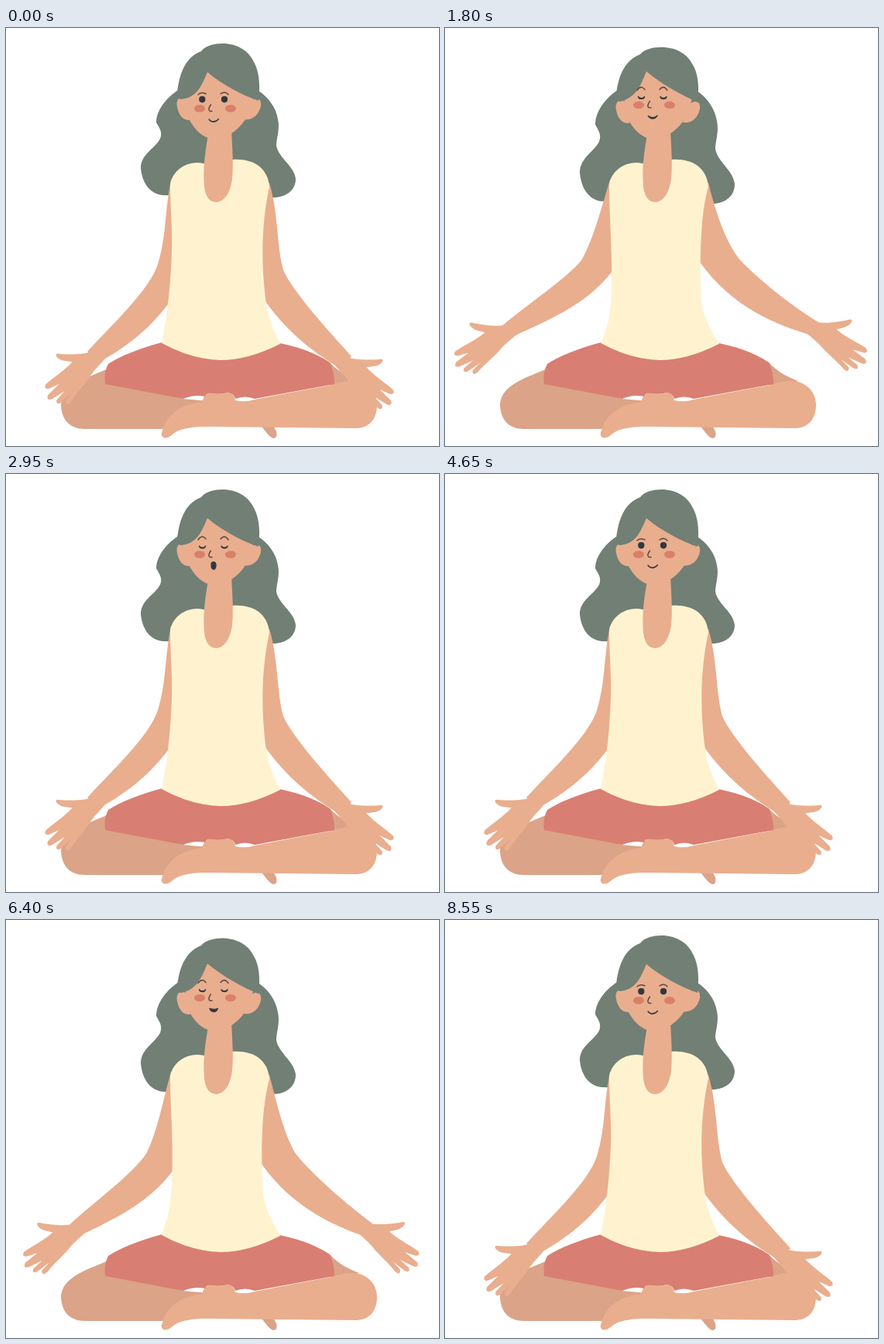
An HTML page that plays this animation: 559x540 px, repeating every 8.8 s.

```html
<!DOCTYPE html>
<html lang="en">
<head>
<meta charset="utf-8">
<title>Breathing exercise</title>
<style>
html, body { margin: 0; width: 100%; height: 100%; overflow: hidden; background: #fff; }
svg { display: block; width: 559px; height: 540px; }
.hair { fill: #717f75; }
.skin { fill: #e9ae8e; }
.shade { fill: #dba388; }
.ink { fill: #30383f; stroke: #30383f; stroke-width: 1.3; stroke-linejoin: round; }
.line { fill: none; stroke: #59463f; stroke-width: 1.4; stroke-linecap: round; }
</style>
</head>
<body>
<svg viewBox="0 0 559 540">
  <defs>
    <!-- left hand, wrist at the origin -->
    <path id="hand" d="M8-8C-5-4-20-6-37-9Q-46-12-43-6C-38 1-29 1-24 3
      C-36 13-50 19-62 27Q-66 33-59 33L-45 29L-61 41Q-65 48-57 47L-39 39
      L-51 49Q-53 56-46 53L-30 42L-40 52Q-40 60-33 54C-24 43-14 36-5 26C3 17 9 13 17 6Z"/>
  </defs>
  <path id="backHair" class="hair" d="M226 78C208 88 194 106 194 122C199 131 202 134 199 143
    C192 156 174 163 174 181C176 201 186 214 202 216L235 217L345 219C361 219 374 210 374 195
    C372 178 352 168 349 152C349 143 354 130 351 118C349 103 338 88 324 80Z"/>

  <path class="shade" d="M132 440C108 451 72 460 71 487C72 509 85 518 102 518L205 518L262 500L262 482L228 479Z"/>
  <path class="shade" d="M418 432C428 443 440 450 456 456L420 466Z"/>
  <path class="shade" d="M329 514C335 520 339 528 345 530Q351 530 349 521L344 512Z"/>
  <path class="skin" d="M420 461C440 454 455 455 463 460C474 466 479 476 479 488C478 510 465 518 447 517L262 515
    C238 515 223 518 215 525Q208 531 203 529Q199 527 202 520C207 500 226 486 253 483C256 475 258 471 266 472
    Q276 474 288 471Q294 472 296 481Q308 484 321 480Z"/>

  <path id="armL" class="skin"/>
  <path id="armR" class="skin"/>
  <path fill="#d97e72" d="M202 406C172 414 147 424 132 434Q126 445 128 460L229 479Q243 473 257 476
    Q258 471 266 472Q276 474 287 471Q294 472 296 479Q309 474 321 479L424 460Q424 444 418 432
    C397 418 373 411 353 407Z"/>
  <use id="handL" href="#hand" class="skin"/>
  <use id="handR" href="#hand" class="skin"/>
  <path id="shirt" fill="#fff3cf"/>

  <path class="skin" d="M262 132C257 160 254 180 256 205C258 220 264 225 272 225C283 224 290 211 292 195
    C294 175 292 155 291 130Z"/>
  <g id="ears" class="skin">
    <path d="M235 92C224 87 219 92 221 102C223 114 230 120 238 119Z"/>
    <path d="M315 94C325 88 330 91 329 101C326 114 316 120 307 118Z"/>
  </g>
  <path class="skin" d="M232 80C231 100 233 112 238 121C246 134 256 143 268 143C285 143 300 132 309 118
    L319 92L300 65L260 50Z"/>
  <path id="frontHair" class="hair"/>
  <g id="features">
    <g fill="#d98069">
      <ellipse cx="250" cy="104" rx="7" ry="4.8"/>
      <ellipse cx="290" cy="104" rx="7" ry="4.8"/>
    </g>
    <path class="line" d="M264.5 99C261 104 260.5 108 266 107.5"/>
    <path id="browL" class="line"/>
    <path id="browR" class="line"/>
    <path id="eyeL" class="ink"/>
    <path id="eyeR" class="ink"/>
    <path id="mouth" class="ink"/>
  </g>
</svg>
<script>
const CYCLE = 4400;
const $ = id => document.getElementById(id);

// Each shape runs between two poses with matching commands.
const poses = {
  armL: ['M213 196C205 235 207 270 196 305C186 338 135 385 105 418L120 432C150 415 182 393 209 357L232 320L232 196Z',
         'M213 196C201 235 192 271 176 300C155 325 108 355 74 384L90 397C130 378 182 358 215 315L232 290L232 196Z'],
  armR: ['M340 200C352 240 349 280 358 313C370 340 415 390 446 424L432 440C400 421 368 398 336 355L318 320L318 200Z',
         'M340 200C350 240 362 275 380 298C405 325 450 360 483 380L472 396C430 384 371 361 329 302L318 285L318 200Z'],
  shirt: ['M212 205C212 187 232 170 255 175L292 170C317 168 338 179 340 205C330 250 329 300 335 350C338 375 345 390 354 408Q313 429 277 429Q239 428 201 407C208 370 212 340 214 290C215 260 212 230 212 205Z',
          'M212 205C212 187 232 170 255 175L292 170C317 168 338 179 340 205C330 240 329 290 330 345C331 370 343 390 354 408Q313 429 277 429Q239 428 201 407C213 380 216 365 215 300C214 260 212 230 212 205Z'],
  frontHair: ['M221 84C224 56 233 37 252 30C261 17 304 13 319 42C328 57 328 76 326 94C306 87 280 74 260 57C252 76 246 90 226 92Q220 91 221 84Z',
              'M221 86C224 60 233 41 252 34C261 22 304 18 319 46C328 60 328 78 326 96C306 87 280 73 260 56C252 76 246 90 226 95Q220 93 221 86Z'],
  browL: ['M248 86Q252 82 258 85', 'M248 85Q253 77.5 258 84'],
  browR: ['M277 85Q283 81 287 86', 'M277 84Q282 77.5 287 85'],
  eyeL: ['M249.8 92C249.8 97 256.8 97 256.8 92C256.8 87.5 249.8 87.5 249.8 92Z',
         'M249.5 93C250 97 257 97 257.5 93C256.5 95.8 250.5 95.8 249.5 93Z'],
  eyeR: ['M278.5 92C278.5 97 285.5 97 285.5 92C285.5 87.5 278.5 87.5 278.5 92Z',
         'M278 93C278.5 97 285.5 97 286 93C285 95.8 279 95.8 278 93Z'],
  mouth: ['M262 118C265 122.5 271 122.5 274.5 117.5C271 122 265 122 262 118Z',
          'M265 117C265 125 271 125 271 118C271 112.5 265 112.5 265 117Z']
};

const mix = (a, b, k) => a + (b - a) * k;

function pose(id, k) {
  const [from, to] = poses[id];
  const ends = to.match(/[\d.]+/g);
  let i = 0;
  $(id).setAttribute('d', from.replace(/[\d.]+/g, n => mix(+n, +ends[i++], k).toFixed(2)));
}

function ease(t, start, end) {
  const u = Math.min(1, Math.max(0, (t - start) / (end - start)));
  return (1 - Math.cos(Math.PI * u)) / 2;
}

// Rises over a..b, falls over c..d.
const swell = (t, a, b, c, d) => ease(t, a, b) - ease(t, c, d);

const place = (id, value) => $(id).setAttribute('transform', value);

function draw(now) {
  const t = now % CYCLE;
  // The deepest breath goes a little past the second pose.
  const breath = 1.16 * swell(t, 700, 1450, 1500, 2700);
  const closed = swell(t, 230, 600, 3860, 4150);
  const open = swell(t, 1500, 2800, 2960, 3650);

  for (const id of ['armL', 'armR', 'shirt', 'frontHair']) pose(id, breath);
  for (const id of ['browL', 'browR', 'eyeL', 'eyeR']) pose(id, closed);
  pose('mouth', open);

  const turn = 8 * breath - 8;
  place('handL', `translate(${mix(109, 75, breath)} ${mix(425, 390, breath)}) rotate(${turn})`);
  place('handR', `translate(${mix(442, 482, breath)} ${mix(432, 386, breath)}) scale(-1 1) rotate(${turn})`);
  place('backHair', `translate(0 ${-4 * breath}) scale(1 ${1 + 0.055 * breath})`);
  place('ears', `translate(0 ${4 * breath})`);
  place('features', `translate(0 ${-4.5 * breath})`);
}

const start = performance.now();
function tick() {
  draw(performance.now() - start);
  requestAnimationFrame(tick);
}
tick();
</script>
</body>
</html>
```
